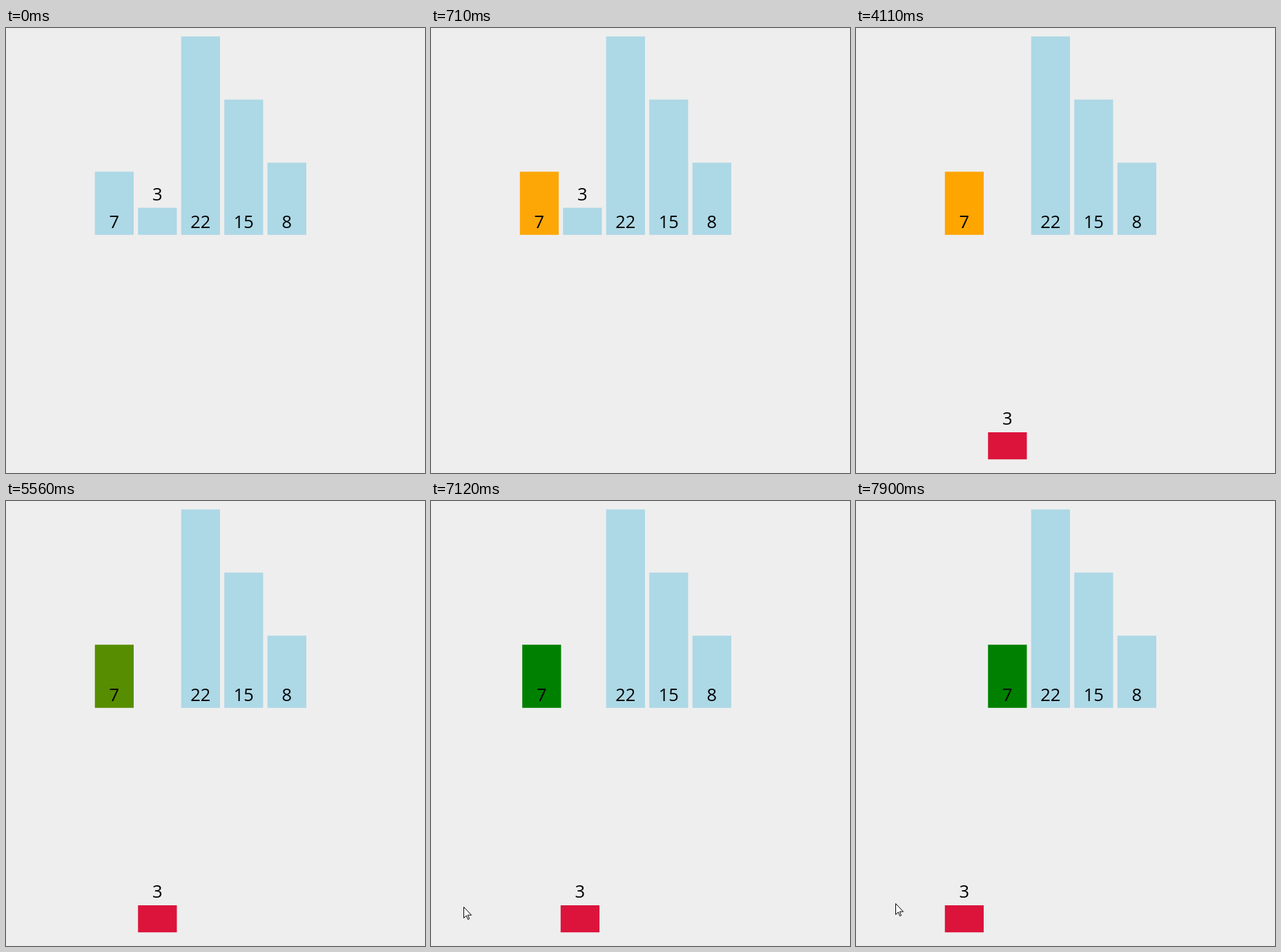
An HTML page that plays this animation: 607 by 645 pixels, repeating every 8000 ms.

```html
<!DOCTYPE html>
<html lang="en">
<head>
<meta charset="utf-8">
<title>Sorting bars</title>
<style>
  html, body { margin: 0; width: 100%; height: 100%; overflow: hidden; background: #eee; }
  svg { display: block; width: 607px; height: 645px; }
  text { font: 25.5px "Open Sans", "Noto Sans", sans-serif; text-anchor: middle; }
</style>
</head>
<body>
<svg id="stage" viewBox="0 0 607 645"></svg>
<script>
const LOOP = 8000, EASE_TIME = 250;
const LEFT = 128.75, PITCH = 62.5, WIDTH = 56.25, BASE = 299.8, UNIT = 13.07, DROP = 325.4;
const BLUE = [173, 216, 230], ORANGE = [255, 165, 0], GREEN = [0, 128, 0], CRIMSON = [220, 20, 60];

// The picture only refreshes at these moments.
const ticks = [0, 650, 710, 3890, 3960, 4040, 4110, 5560, 5640, 6160, 6250, 7120, 7210, 7300, 7630, 7900];

// time, x, y of the pointer tip
const pointerStops = [
  [6160, 37, 588], [6250, 38, 589], [7120, 47, 588], [7210, 58, 587],
  [7300, 59, 587], [7630, 58, 585], [7900, 57, 583]
];

const stage = document.getElementById("stage");

function add(parent, tag, attrs) {
  const node = document.createElementNS("http://www.w3.org/2000/svg", tag);
  for (const key in attrs) node.setAttribute(key, attrs[key]);
  return parent.appendChild(node);
}

function makeBar(value, index) {
  const group = add(stage, "g", {});
  const height = value * UNIT, top = BASE - height;
  const rect = add(group, "rect", { x: LEFT + index * PITCH, y: top, width: WIDTH, height });
  const label = add(group, "text", {
    x: LEFT + index * PITCH + WIDTH / 2,
    y: height < 50 ? top - 10.5 : BASE - 9.8
  });
  label.textContent = value;
  return { group, rect };
}

const bars = [7, 3, 22, 15, 8].map(makeBar);
const pointer = add(stage, "path", {
  d: "M.5 .5V16.5L4.2 12.9L6.6 18.5L8.6 17.6L6.3 12.2H11.5Z",
  fill: "#fff", stroke: "#000", "stroke-width": 1
});

function progress(time, start) {
  const t = Math.min(1, Math.max(0, (time - start) / EASE_TIME));
  return t < 0.5 ? 4 * t ** 3 : 1 - 4 * (1 - t) ** 3;
}

const mix = (from, to, p) => from.map((c, i) => c + (to[i] - c) * p);

function setBar(bar, color, dx = 0, dy = 0) {
  bar.rect.setAttribute("fill", `rgb(${color.map(Math.round)})`);
  bar.group.setAttribute("transform", `translate(${dx} ${dy})`);
}

function draw(time) {
  const now = ticks.filter(t => t <= time).pop();
  const drop = progress(now, 3825);
  const swap = progress(now, 7060) * PITCH;
  const marked = mix(BLUE, ORANGE, progress(now, 509));

  setBar(bars[0], mix(marked, GREEN, progress(now, 5420)), swap);
  setBar(bars[1], mix(BLUE, CRIMSON, drop), -swap, drop * DROP);
  bars.slice(2).forEach(bar => setBar(bar, BLUE));

  const stop = pointerStops.filter(s => s[0] <= now).pop();
  pointer.setAttribute("visibility", stop ? "visible" : "hidden");
  if (stop) pointer.setAttribute("transform", `translate(${stop[1]} ${stop[2]})`);
}

const begin = performance.now();
function frame() {
  draw((performance.now() - begin) % LOOP);
  requestAnimationFrame(frame);
}
frame();
</script>
</body>
</html>
```
